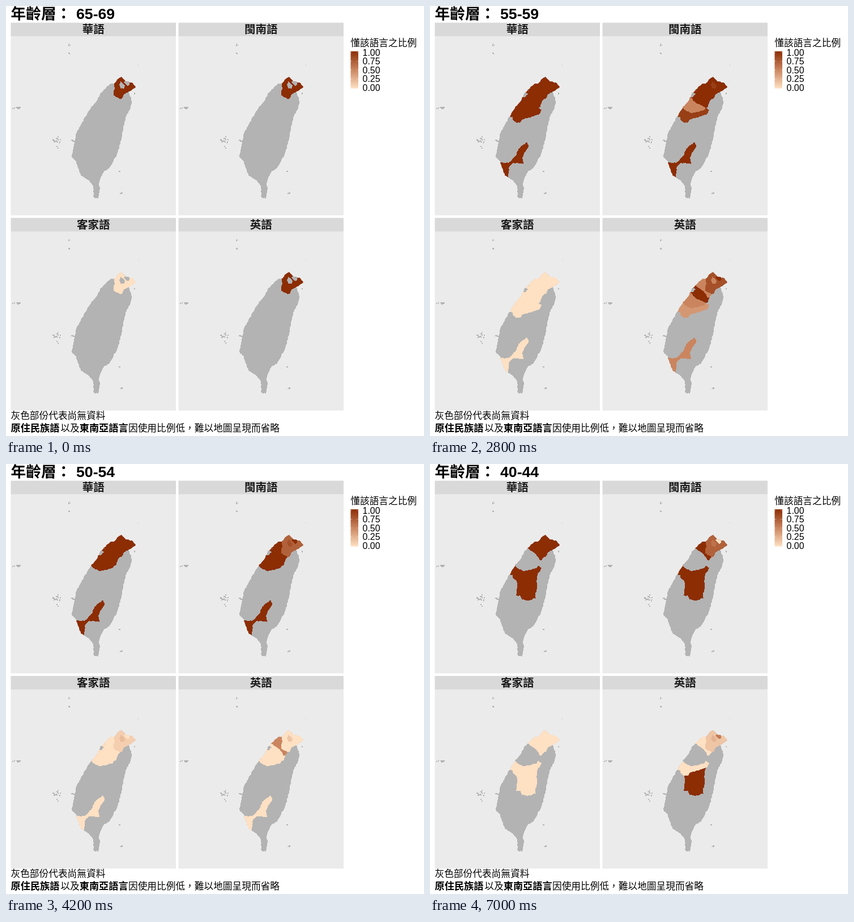
Animation of 738 by 759 pixels, one loop 8000 ms. Source, as an HTML page:

```html
<!DOCTYPE html>
<html lang="zh-TW">
<head>
<meta charset="utf-8">
<style>
html, body { margin: 0; width: 100%; height: 100%; overflow: hidden; background: #fff; }
svg { display: block; font-family: "Liberation Sans", "Noto Sans CJK TC", "Noto Sans CJK", sans-serif; }
.map, clipPath { shape-rendering: crispEdges; }
.title { font-size: 26.67px; font-weight: bold; }
.strip { font-size: 19.5px; font-weight: bold; text-anchor: middle; fill: #1a1a1a; }
.label { font-size: 16px; }
.small { font-size: 16.7px; }
.strong { font-size: 17.2px; font-weight: bold; }
</style>
</head>
<body>
<svg id="stage" width="738" height="759" viewBox="0 0 738 759"></svg>
<script>
const GRAY = '#b3b3b3';
const LOW = [254, 224, 195], MID = [202, 133, 95], HIGH = [140, 45, 4];
const STEP = 1400, LOOP = 8000;

// Key points of the coast; rough() supplies the ragged detail between them.
const island = '204,125 211,133 222,135 229,143 217,151 222,168 218,184 211,198 207,216 205,230 196,262 ' +
  '182,287 173,291 166,306 164,314 166,322 163,340 155,338 154,318 145,307 132,299 124,275 116,266 ' +
  '122,236 124,225 145,187 165,160 166,155 172,149 185,137 191,137 196,130';

// Painted from south to north and clipped to the coast: each area overlaps the one before it.
const areas = [
  '110,276 139,277 145,271 153,262 156,252 163,246 172,240 174,248 166,261 163,268 165,279 147,277 140,284 138,306 120,306',
  '152,200 192,189 188,206 189,220 186,228 187,237 172,241 162,239 160,233 152,232 154,212',
  '135,195 146,196 147,202 152,206 159,206 163,200 180,195 194,190 197,183 190,179 165,175 140,170',
  '140,180 150,180 158,186 165,189 177,187 188,184 191,178 180,165 165,155 150,165',
  '158,161 164,161 172,170 186,177 191,180 195,178 197,169 188,155 168,148',
  '165,149 172,149 183,156 192,165 194,170 198,169 201,163 195,140 190,130 170,135',
  '189,136 192,145 190,150 190,158 196,161 201,164 206,162 208,156 217,151 235,148 235,120 190,120',
  '200,139 202,133 207,137 210,141 208,146 203,146',
  '208,135 211,130 219,130 218,139 214,141'
];
const grayCity = '160,150 168,152 173,156 169,160 160,161';

// Island groups: x, y, width, height, count.
const islets = [
  [11, 177, 13, 3, 10], [110, 66, 3, 4, 3], [109, 81, 3, 3, 3], [83, 232, 12, 8, 14], [82, 222, 13, 28, 7],
  [114, 235, 5, 5, 4], [198, 290, 2, 2, 2], [200, 328, 4, 3, 4], [225, 153, 2, 1, 2], [233, 104, 0, 0, 1]
];

// One entry per age group, one string per panel, one character per area:
// base-36 digits count twentieths, "-" is no data.
const steps = [
  ['65-69', '------k--', '------k--', '------0--', '------k--'],
  ['60-64', 'kkk---kkk', 'k0k---kkk', '0k0---040', 'kkk---f40'],
  ['55-59', 'k-kkkkkkk', 'k-iakkkik', '0-0000000', 'a-8akagak'],
  ['50-54', 'k--kkkkkk', 'k--kkkegk', '0--000240', '0--00a030'],
  ['45-49', 'k-k--kkkk', 'a-a--kikk', '0-0--0000', 'a-0--035k'],
  ['40-44', '-kk--kkkk', '-kk--kec0', '-00--0000', '-k0--035b']
];

// Noise from -0.5 to 0.5 that depends on the place alone.
function noise(x, y) {
  const s = Math.sin(x * 12.9898 + y * 78.233) * 43758.5453;
  return s - Math.floor(s) - .5;
}

function rough(points) {
  const corners = points.split(' ').map(p => p.split(',').map(Number));
  const out = [];
  corners.forEach(([x, y], i) => {
    const [nx, ny] = corners[(i + 1) % corners.length];
    const parts = Math.ceil(Math.hypot(nx - x, ny - y) / 3);
    for (let k = 0; k < parts; k++) {
      const px = x + (nx - x) * k / parts, py = y + (ny - y) * k / parts;
      const sway = k ? 1.6 : 0;
      out.push([px + sway * noise(px, py), py + sway * noise(py, px)]);
    }
  });
  return 'M' + out.map(p => p.map(v => v.toFixed(1))).join('L') + 'Z';
}

function scatter([x, y, w, h, count]) {
  let d = '';
  for (let i = 0; i < count; i++) {
    const px = x + w * (noise(i, x) + .5), py = y + h * (noise(y, i) + .5);
    const size = Math.min(count, 2 + noise(px, py));
    d += `M${px},${py}h${size}v${size}h${-size}z`;
  }
  return d;
}

const mix = (a, b, t) => `rgb(${a.map((v, i) => Math.round(v + (b[i] - v) * t))})`;
const ramp = t => t < .5 ? mix(LOW, MID, t * 2) : mix(MID, HIGH, t * 2 - 1);
const shade = digit => digit === '-' ? GRAY : ramp(parseInt(digit, 36) / 20);

const text = (x, y, s, cls, id = '') => `<text x="${x}" y="${y}" class="${cls}" id="${id}">${s}</text>`;
const path = (d, cls = '') => `<path d="${d}" fill="${GRAY}" class="${cls}"/>`;

const map = path(rough(island) + islets.map(scatter).join('')) +
  `<g clip-path="url(#coast)">${areas.map(a => path(rough(a), 'area')).join('')}${path(rough(grayCity))}</g>`;

const panels = ['華語', '閩南語', '客家語', '英語'].map((label, i) =>
  `<g transform="translate(${i % 2 * 296} ${i > 1 ? 344.6 : 0})">
    <rect x="8.5" y="53" width="291.5" height="316.5" fill="#ebebeb"/>
    <rect x="8.5" y="29.5" width="291.5" height="23.8" fill="#d9d9d9"/>
    ${text(154.3, 48.4, label, 'strip')}<g class="map">${map}</g>
  </g>`).join('');

const marks = [1, .75, .5, .25, 0];
const legend = `<rect x="608.5" y="80" width="13.5" height="65.5" fill="url(#scale)"/>` +
  text(608.3, 71, '懂該語言之比例', 'small') +
  marks.map(v => {
    const y = 144 - v * 62;
    return text(629.5, y + 5.9, v.toFixed(2), 'label') +
      `<path d="M608.5,${y}h2.7m8,0h2.7" stroke="#fff" stroke-width=".4"/>`;
  }).join('');

const stage = document.getElementById('stage');
stage.innerHTML = `<clipPath id="coast"><path d="${rough(island)}"/></clipPath>
  <linearGradient id="scale" x2="0" y2="1">
    ${marks.map(v => `<stop offset="${1 - v}" stop-color="${ramp(v)}"/>`).join('')}
  </linearGradient>` +
  text(8.6, 23, '年齡層：', 'title') + text(124, 23, '', 'title', 'age') +
  panels + legend +
  text(8.5, 728.8, '灰色部份代表尚無資料', 'small') +
  text(8.5, 750.8, '原住民族語', 'strong') + text(96.3, 750.8, '以及', 'small') +
  text(129.7, 750.8, '東南亞語言', 'strong') + text(216, 750.8, '因使用比例低，難以地圖呈現而省略', 'small');

const age = document.getElementById('age');
const shapes = stage.querySelectorAll('.area');
const start = performance.now();
let shown = -1;

function tick() {
  const step = Math.floor((performance.now() - start) % LOOP / STEP);
  if (step !== shown) {
    shown = step;
    const [label, ...states] = steps[step];
    age.textContent = label;
    [...states.join('')].forEach((digit, i) => shapes[i].setAttribute('fill', shade(digit)));
  }
  requestAnimationFrame(tick);
}
tick();
</script>
</body>
</html>
```
